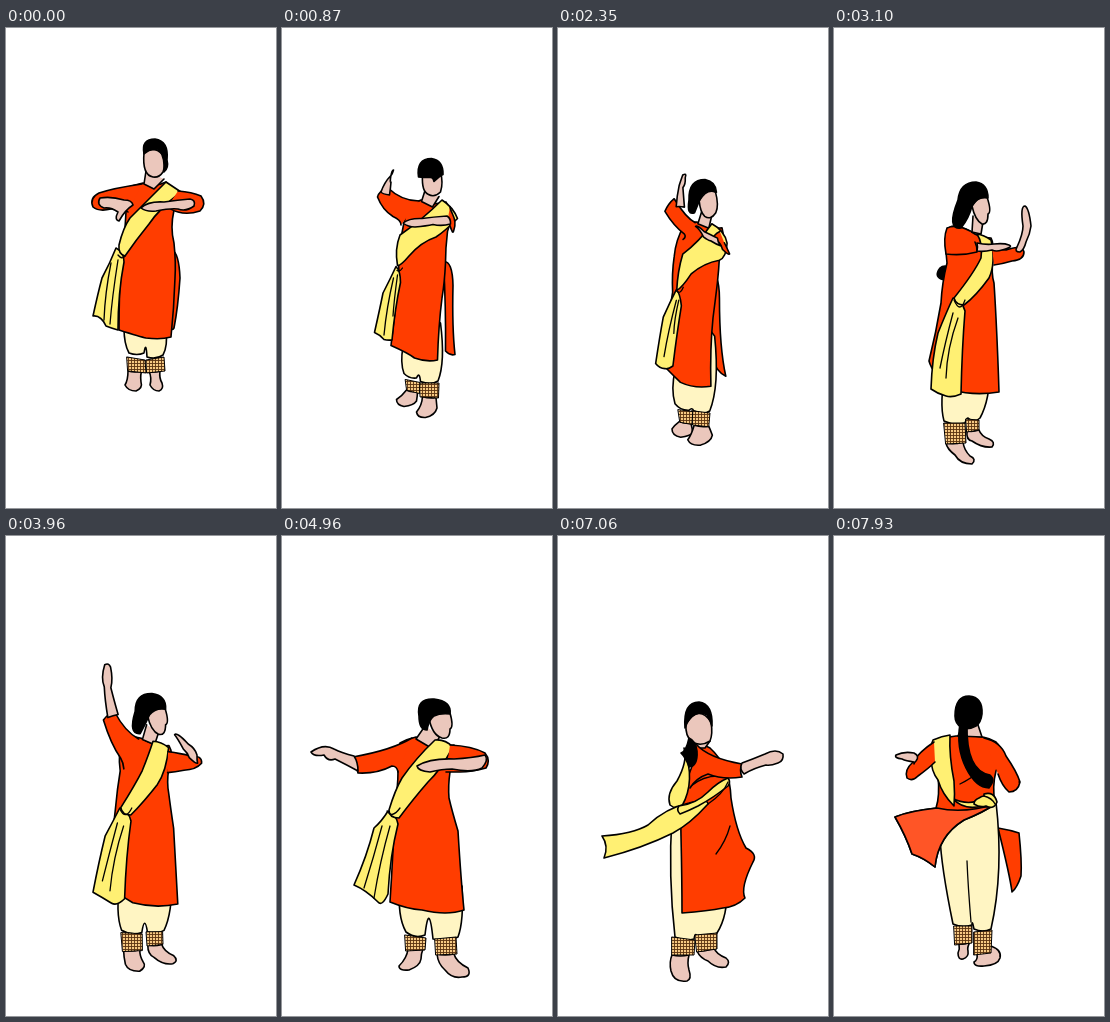
Recreate the animation shown at these times as an HTML page without scripts. Size 270 by 480 pixels, loop 8000 ms.

```html
<!DOCTYPE html>
<html lang="en">
<head>
<meta charset="utf-8">
<title>Dancer</title>
<style>
html,body{margin:0;width:100%;height:100%;overflow:hidden;background:#fff}
svg{display:block;width:100vw;height:100vh}
path{stroke:#000;stroke-width:1.6;stroke-linejoin:round;stroke-linecap:round;animation:8s steps(7) infinite}
.skin{fill:#ebc7bc}
.red{fill:#ff3d00}
.scarf{fill:#fff073}
.pale{fill:#fff5c3}
.bells{fill:url(#bells);stroke-width:1}
.line{fill:none;stroke-width:1.3}

/* Each part morphs between key poses; the step counts keep one drawing per 124 ms. */
#panel{animation-name:panel}
@keyframes panel{
0%{d:path("M166 222Q173 225 174 250 172 280 168 300 166 303 165 300 168 260 166 222Z");animation-timing-function:steps(14)}
21.62%{d:path("M157 245Q168 240 168 265 168 320 178 353 170 353 162 346 160 300 157 245Z");animation-timing-function:steps(11)}
38.75%{d:path("M140 240Q150 250 150 280 150 320 150 340 140 330 138 300 140 270 140 240Z");animation-timing-function:steps(32)}
88.25%{d:path("M160 270Q168 280 168 300 172 330 170 350 165 350 160 345 158 300 160 270Z")}
99.12%,to{d:path("M164 292Q176 294 185 297 188 325 187 340 183 352 178 356 176 340 164 292Z")}}
#backBraid{animation-name:backBraid}
@keyframes backBraid{
0%{d:path("M150 200Q150 200 150 200 150 200 150 200 150 200 150 200 150 200 150 200Z");animation-timing-function:steps(14)}
21.62%{d:path("M163 224Q158 230 161 240 165 247 170 239 175 232 171 226 167 223 163 224Z");animation-timing-function:steps(11)}
38.75%{d:path("M106 240Q100 248 107 251 114 254 116 242 116 238 111 238 108 238 106 240Z");animation-timing-function:steps(15)}
62%,to{d:path("M135 250Q135 250 135 250 135 250 135 250 135 250 135 250 135 250 135 250Z")}}
#footA{animation-name:footA}
@keyframes footA{
0%{d:path("M122 343Q122 352 119 357 122 363 130 363 137 360 135 354 134 346 136 343 129 345 122 343Z");animation-timing-function:steps(14)}
21.62%{d:path("M127 381Q118 384 110 386 107 391 114 394 126 395 134 392 137 388 135 384 130 384 127 381Z");animation-timing-function:steps(11)}
38.75%{d:path("M112 415Q113 421 121 427 126 436 138 436 143 431 136 428 130 422 129 414 120 417 112 415Z");animation-timing-function:steps(15)}
62%{d:path("M126 413Q125 422 117 430 117 435 127 434 138 430 139 423 139 418 141 413 133 415 126 413Z");animation-timing-function:steps(10)}
77.37%{d:path("M127 405Q121 412 123 422 138 434 146 440 154 441 152 435 145 427 144 411 135 409 127 405Z")}
88.25%{d:path("M114 419Q111 426 113 435 116 447 129 445 134 443 131 434 129 427 131 419 122 421 114 419Z")}
99.12%,to{d:path("M125 408Q126 413 124 417 124 424 129 423 135 421 134 415 133 411 136 406 130 409 125 408Z")}}
#footB{animation-name:footB}
@keyframes footB{
0%{d:path("M143 343Q146 350 144 357 147 363 153 363 158 361 156 355 153 350 154 343 149 345 143 343Z");animation-timing-function:steps(14)}
21.62%{d:path("M138 394Q134 405 125 411 124 417 134 416 148 414 154 405 156 400 154 396 146 397 138 394Z");animation-timing-function:steps(11)}
38.75%{d:path("M133 403Q132 412 138 413 148 420 158 419 162 414 155 411 147 408 145 402 139 404 133 403Z");animation-timing-function:steps(15)}
62%{d:path("M155 418Q156 428 163 434 170 443 180 441 190 441 186 432 174 426 172 418 163 420 155 418Z");animation-timing-function:steps(10)}
77.37%{d:path("M152 413Q154 419 166 422 175 428 186 426 189 421 180 418 170 415 168 411 160 415 152 413Z")}
88.25%{d:path("M139 415Q142 422 150 425 158 433 168 431 173 426 168 422 158 418 156 412 147 416 139 415Z")}
99.12%,to{d:path("M143 418Q144 424 140 426 140 431 150 430 164 429 166 422 168 414 157 410 150 416 143 418Z")}}
#pants{animation-name:pants}
@keyframes pants{
0%{d:path("M118 300Q118 316 123 325 131 328 138 325 140 312 141 329 150 332 157 327 162 318 160 300 140 296 118 300Z");animation-timing-function:steps(14)}
21.62%{d:path("M150 272Q110 330 121 366 124 374 131 375 135 374 136 378 148 383 155 379 165 350 157 290 156 274 150 272Z");animation-timing-function:steps(11)}
38.75%{d:path("M112 340Q105 375 110 393 120 398 131 395 133 388 135 391 141 395 146 390 156 372 156 340 134 330 112 340Z");animation-timing-function:steps(15)}
62%{d:path("M118 350Q115 380 124 396 133 403 143 399 147 364 151 403 165 406 176 401 182 385 180 350 148 345 118 350Z");animation-timing-function:steps(10)}
77.37%{d:path("M140 350Q133 382 138 388 146 388 152 394 156 400 160 400 168 402 172 398 185 378 184 350 160 345 140 350Z")}
88.25%{d:path("M114 280Q110 340 117 401 127 406 136 403 137 396 139 400 150 402 159 397 170 380 169 350 150 270 114 280Z")}
99.12%,to{d:path("M106 300Q107 330 119 388 128 392 138 389 138 383 140 393 149 397 157 393 170 335 162 266 115 270 106 300Z")}}
#bellsA{animation-name:bellsA}
@keyframes bellsA{
0%{d:path("M121 329L139 332 140 345 122 343Z");animation-timing-function:steps(14)}
21.62%{d:path("M126 374L137 377 135 386 128 382Z");animation-timing-function:steps(11)}
38.75%{d:path("M110 395L131 395 132 415 112 416Z");animation-timing-function:steps(15)}
62%{d:path("M123 399L144 402 143 414 124 415Z");animation-timing-function:steps(10)}
77.37%{d:path("M131 390L150 398 147 412 127 406Z")}
88.25%{d:path("M114 401L137 404 136 419 114 419Z")}
99.12%,to{d:path("M120 390L138 390 138 407 121 409Z")}}
#bellsB{animation-name:bellsB}
@keyframes bellsB{
0%{d:path("M140 332L158 329 159 343 141 345Z");animation-timing-function:steps(14)}
21.62%{d:path("M135 378L156 381 154 397 136 393Z");animation-timing-function:steps(11)}
38.75%{d:path("M132 391L145 392 145 402 133 404Z");animation-timing-function:steps(15)}
62%{d:path("M153 403L174 401 175 418 154 419Z");animation-timing-function:steps(10)}
77.37%{d:path("M150 399L170 397 170 411 154 414Z")}
88.25%{d:path("M137 399L159 397 159 413 139 416Z")}
99.12%,to{d:path("M140 396L158 394 157 417 140 419Z")}}
#kurta{animation-name:kurta}
@keyframes kurta{
0%{d:path("M137 155Q128 157 120 160 121 180 119 200 114 215 115 230 113 270 113 302 135 309 140 310 155 312 165 309 168 280 169 250 170 235 168 215 164 200 168 182 172 168 160 154 148 160 137 155Z");animation-timing-function:steps(14)}
21.62%{d:path("M141 189Q138 192 132 196 122 210 118 225 117 240 119 258 113 300 105 333 117 341 125 350 135 357 146 355 145 315 151 290 155 275 159 255 163 240 163 225 172 210 168 194 152 196 141 189Z");animation-timing-function:steps(11)}
38.75%{d:path("M136 203Q122 196 116 199 110 215 113 235 108 255 107 275 102 305 95 333 98 345 118 362 140 368 165 364 164 330 162 290 161 270 160 255 157 245 159 232 160 215 157 210 146 210 136 203Z");animation-timing-function:steps(15)}
62%{d:path("M134 201Q125 203 118 207 114 220 116 235 116 250 113 270 111 320 108 366 125 373 140 374 165 380 182 374 179 345 176 295 170 275 167 262 166 250 168 236 180 220 172 209 152 212 134 201Z");animation-timing-function:steps(10)}
77.37%{d:path("M137 206Q133 210 133 216 135 235 130 250 127 275 129 310 125 340 131 362 134 377 158 377 176 379 189 372 190 345 182 312 176 292 177 265 180 250 177 240 178 220 163 212 150 207 137 206Z")}
88.25%{d:path("M138 208Q136 215 135 228 128 245 126 255 122 275 123 300 124 345 124 377 150 375 165 372 178 371 187 362 182 352 195 326 200 318 188 312 178 295 173 262 172 230 152 212 145 208 138 208Z")}
99.12%,to{d:path("M122 200Q112 201 103 206 96 222 104 240 106 260 102 272 75 275 61 281 72 300 78 318 90 322 101 331 104 300 130 284 150 276 161 268 158 250 162 235 172 215 162 206 150 198 122 200Z")}}
#flap{fill:#ff5526;animation-name:flap}
@keyframes flap{
0%,88.25%{d:path("M124 300Q124 300 124 300 124 300 124 300 124 300 124 300 124 300 124 300 124 300 124 300 124 300 124 300Z");visibility:hidden}
99.12%,to{d:path("M103 272Q75 275 61 281 72 300 78 318 90 322 101 331 104 300 130 284 150 276 161 268 130 278 103 272Z");visibility:visible}}
#wrap{animation-name:wrap}
@keyframes wrap{
0%,62%{d:path("M130 245Q130 245 130 245 130 245 130 245 130 245 130 245 130 245 130 245Z");visibility:hidden;animation-timing-function:steps(10)}
77.37%{d:path("M132 233Q126 255 128 268 132 285 139 289 148 288 150 280 134 265 132 233Z")}
88.25%{d:path("M126 212Q130 225 119 245 108 258 112 269 118 274 124 270 138 245 126 212Z")}
99.12%,to{d:path("M118 262Q135 271 150 262 160 256 162 265 158 273 148 270 130 275 118 262Z")}}
#tail{animation-name:tail}
@keyframes tail{
0%{d:path("M110 220Q118 224 118 234 112 265 112 302 105 300 100 298 95 287 87 288 92 265 96 250 104 235 110 220Z");animation-timing-function:steps(14)}
21.62%{d:path("M118 257Q119 262 119 275 114 295 108 322 106 325 104 325 100 326 98 321 104 295 106 280 112 268 118 257Z");animation-timing-function:steps(11)}
38.75%{d:path("M119 270Q128 272 131 283 128 320 127 366 118 370 112 368 104 366 97 361 98 330 104 305 112 285 119 270Z");animation-timing-function:steps(15)}
62%{d:path("M106 275Q114 278 116 288 108 320 106 358 100 371 96 366 84 354 72 349 85 320 92 292 100 285 106 275Z");animation-timing-function:steps(10)}
77.37%{d:path("M176 240Q182 260 166 290 146 325 130 362 115 364 100 362 96 355 95 348 104 331 130 312 164 285 176 240Z")}
88.25%{d:path("M131 267Q150 262 150 268 132 288 115 297 85 312 46 322 51 310 44 300 75 298 90 289 108 272 131 267Z")}
99.12%,to{d:path("M150 258Q160 255 163 266 160 274 152 270 146 272 140 268 140 264 145 262 148 260 150 260 150 259 150 258Z")}}
#band{animation-name:band}
@keyframes band{
0%{d:path("M160 154Q166 158 175 164 153 181 143 196 130 212 119 228 112 226 113 217 117 200 124 190 143 171 160 154Z");animation-timing-function:steps(14)}
21.62%{d:path("M160 190Q176 200 176 217 172 226 165 222 148 216 135 228 125 250 118 258 108 242 112 224 138 212 160 190Z");animation-timing-function:steps(11)}
38.75%{d:path("M143 206Q150 207 157 212 162 235 155 250 142 268 130 277 122 277 120 270 140 245 147 230 149 215 143 206Z");animation-timing-function:steps(15)}
62%{d:path("M153 204Q163 203 171 211 158 235 146 246 132 262 117 282 107 282 107 274 113 254 120 242 134 222 153 204Z");animation-timing-function:steps(10)}
77.37%{d:path("M155 207Q167 212 175 222 178 232 177 240 173 228 168 222 165 218 162 214 158 210 156 208 155 207 155 207Z")}
88.25%{d:path("M170 242Q173 246 170 250 155 262 140 270 130 275 122 278 118 274 121 270 138 268 150 256 160 246 170 242Z")}
99.12%,to{d:path("M99 204Q108 200 116 199 115 220 120 245 121 258 120 270 108 258 104 244 97 235 97 222 96 210 99 204Z")}}
#folds{animation-name:folds}
@keyframes folds{
0%{d:path("M105 235Q99 265 98 292M112 232Q106 270 104 296M112 227Q116 232 119 228");animation-timing-function:steps(14)}
21.62%{d:path("M118 265Q110 295 106 322M119 262Q118 275 118 280M118 258Q120 256 122 252");animation-timing-function:steps(11)}
38.75%{d:path("M119 285Q111 315 106 340M124 290Q113 320 112 350M120 272Q126 286 131 272");animation-timing-function:steps(15)}
62%{d:path("M100 290Q92 320 82 352M108 290Q98 325 92 362M105 275Q110 283 118 272");animation-timing-function:steps(10)}
77.37%{d:path("M166 268Q150 292 132 318M140 262Q138 246 142 238M142 380Q155 390 168 378")}
88.25%{d:path("M172 290Q168 305 158 318M150 268Q165 258 170 246M133 250Q145 240 160 240")}
99.12%,to{d:path("M126 248Q138 242 146 235M150 260Q158 262 161 268M133 325Q134 350 137 386")}}
#neck{animation-name:neck}
@keyframes neck{
0%{d:path("M140 143L138 156 148 161 158 151");animation-timing-function:steps(14)}
21.62%{d:path("M146 182L141 191 153 197 156 186");animation-timing-function:steps(11)}
38.75%{d:path("M139 188L138 204 147 206 149 194");animation-timing-function:steps(15)}
62%{d:path("M143 190L134 203 151 213 158 200");animation-timing-function:steps(10)}
77.37%{d:path("M136 200L134 209 148 212 152 205")}
88.25%{d:path("M134 202L132 212 147 212 152 205")}
99.12%,to{d:path("M129 188L124 200 148 201 143 186")}}
#sleeveR{animation-name:sleeveR}
@keyframes sleeveR{
0%{d:path("M172 163Q186 164 195 168 201 176 194 183 182 187 172 184 164 182 162 178");animation-timing-function:steps(14)}
21.62%{d:path("M164 194Q150 198 146 204 148 212 150 220 160 225 168 222 172 216 170 202");animation-timing-function:steps(11)}
38.75%{d:path("M158 220Q165 222 172 222 188 216 190 224 190 232 178 233 168 236 160 237");animation-timing-function:steps(15)}
62%{d:path("M168 209Q190 210 203 217 209 224 204 232 190 236 178 236 170 236 164 236");animation-timing-function:steps(6)}
71.24%{d:path("M168 209Q195 214 220 215 222 222 222 230 200 236 180 238 172 240 166 238");animation-timing-function:steps(4)}
77.37%{d:path("M150 220Q160 220 170 228 172 232 172 238 160 240 155 238 150 236 150 235")}
88.25%{d:path("M150 222Q160 225 175 230 176 234 176 238 160 240 155 237 150 236 148 235")}
99.12%,to{d:path("M150 202Q167 206 172 220 183 236 186 246 184 256 175 256 168 250 164 238")}}
#armR{animation-name:armR}
@keyframes armR{
0%{d:path("M184 171Q172 172 158 174 142 173 135 180 140 184 150 183 165 180 172 181 180 184 188 178 190 172 184 171Z");animation-timing-function:steps(14)}
21.62%{d:path("M146 205Q130 206 122 207 112 207 107 210 112 214 116 215 124 216 130 212 140 213 149 214 148 209 146 205Z");animation-timing-function:steps(11)}
38.75%{d:path("M183 219Q189 206 189 198 186 178 191 178 195 180 197 198 196 206 192 214 190 222 186 224 180 224 183 219Z");animation-timing-function:steps(15)}
62%{d:path("M203 219Q190 222 172 223 148 222 135 230 136 235 148 236 160 233 170 233 190 237 200 232 207 224 203 219Z");animation-timing-function:steps(6)}
71.24%{d:path("M220 216Q232 214 242 213 255 207 268 212 262 216 256 219 250 224 243 222 232 226 222 229 222 222 220 216Z");animation-timing-function:steps(4)}
77.37%{d:path("M176 227Q185 228 190 229 196 226 198 232 198 236 194 236 190 236 188 235 184 236 178 238 176 232 176 227Z")}
88.25%{d:path("M184 228Q195 225 207 220 216 216 222 220 223 224 218 225 212 227 208 227 196 230 186 236 183 232 184 228Z")}
99.12%,to{d:path("M185 246Q185 246 185 246 185 246 185 246 185 246 185 246 185 246 185 246 185 246 185 246 185 246 185 246Z")}}
#sleeveL{animation-name:sleeveL}
@keyframes sleeveL{
0%{d:path("M136 156Q108 160 93 165 83 170 87 179 93 184 105 181 118 180 122 184");animation-timing-function:steps(14)}
21.62%{d:path("M138 190Q131 186 118 154 111 156 104 159 108 180 117 196 120 204 116 210");animation-timing-function:steps(11)}
38.75%{d:path("M136 203Q122 196 113 200 109 210 112 226 128 228 143 224 143 218 141 214")}
49.56%{d:path("M132 203Q118 195 108 172 101 172 95 177 101 205 110 222 113 228 114 236");animation-timing-function:steps(8)}
62%{d:path("M130 202Q110 214 71 221 74 228 76 237 95 238 110 230 115 230 116 236");animation-timing-function:steps(10)}
77.37%{d:path("M140 206Q158 212 176 226 174 234 178 241 155 244 140 240 136 242 136 250")}
88.25%{d:path("M138 208Q150 222 184 228 181 234 184 241 165 244 150 238 138 242 132 252")}
99.12%,to{d:path("M100 206Q85 216 79 226 70 234 73 242 78 246 84 240 95 232 101 226")}}
#armL{animation-name:armL}
@keyframes armL{
0%{d:path("M94 170Q105 168 118 172 126 172 127 177 119 182 113 193 108 192 112 184 105 179 98 180 90 177 94 170Z");animation-timing-function:steps(14)}
21.62%{d:path("M104 158Q100 140 99 124 94 122 96 107 100 102 104 108 108 118 106 124 112 142 117 154 110 155 104 158Z");animation-timing-function:steps(11)}
38.75%{d:path("M143 215Q152 217 160 216 170 215 175 217 180 219 168 222 162 224 158 222 150 224 143 223 144 219 143 215Z")}
49.56%{d:path("M95 176Q90 155 88 140 82 130 86 114 90 111 94 116 98 130 96 140 102 158 107 171 101 173 95 176Z");animation-timing-function:steps(8)}
62%{d:path("M72 220Q60 217 52 213 42 207 29 216 32 221 42 219 46 226 53 223 65 229 76 235 76 226 72 220Z");animation-timing-function:steps(10)}
77.37%{d:path("M176 226Q185 226 190 226 198 222 200 230 200 238 196 237 192 238 190 236 184 238 178 240 175 233 176 226Z")}
88.25%{d:path("M184 227Q195 223 207 218 218 212 225 218 226 225 220 227 212 230 208 229 196 232 186 238 181 233 184 227Z")}
99.12%,to{d:path("M80 226Q72 225 68 223 60 222 62 219 70 215 80 217 86 220 82 225 80 227 80 228 80 228 80 226Z")}}
#face{animation-name:face}
@keyframes face{
0%{d:path("M138 125Q148 117 157 127 160 136 157 144 153 150 147 149 136 147 138 125Z");animation-timing-function:steps(14)}
21.62%{d:path("M143 170Q150 157 160 161 163 174 160 184 152 190 146 184 143 180 143 170Z");animation-timing-function:steps(11)}
38.75%{d:path("M138 178Q146 166 153 169 158 184 154 186 154 197 148 196 141 192 138 178Z");animation-timing-function:steps(15)}
62%{d:path("M147 182Q158 170 168 177 172 191 168 193 168 204 160 202 150 199 147 182Z");animation-timing-function:steps(10)}
77.37%{d:path("M134 188Q147 168 158 184 160 196 157 203 147 209 139 204 133 198 134 188Z")}
88.25%{d:path("M128 188Q141 168 153 186 155 198 152 205 143 211 134 206 127 200 128 188Z")}
99.12%,to{d:path("M128 180Q138 172 146 180 146 186 142 189 137 191 130 190 128 188 128 180Z")}}
#hair{animation-name:hair}
@keyframes hair{
0%{d:path("M138 126Q135 111 149 111 163 113 161 132 163 140 158 144 159 130 154 123 146 119 138 126Z");animation-timing-function:steps(14)}
21.62%{d:path("M135 172Q133 150 150 150 160 152 161 161 152 156 146 163 143 168 142 176 138 180 135 172Z");animation-timing-function:steps(11)}
38.75%{d:path("M124 172Q126 154 142 154 154 156 154 170 143 168 138 178 135 190 127 200 112 202 124 172Z");animation-timing-function:steps(15)}
62%{d:path("M137 180Q134 162 152 163 170 165 168 178 158 177 152 180 147 184 145 194 137 194 137 180Z");animation-timing-function:steps(10)}
77.37%{d:path("M133 192Q129 166 146 166 160 168 159 188 157 184 154 178 145 172 138 180 135 186 133 192Z")}
88.25%{d:path("M127 192Q125 166 141 166 155 168 154 190 152 184 149 179 141 174 133 181 129 186 127 192Z")}
99.12%,to{d:path("M121 180Q121 160 135 160 149 161 148 178 147 187 142 190 135 194 128 192 121 188 121 180Z")}}
#braid{animation-name:braid}
@keyframes braid{
0%{d:path("M150 116Q150 116 150 116 150 116 150 116 150 116 150 116 150 116 150 116Z");animation-timing-function:steps(14)}
21.62%{d:path("M147 156Q147 156 147 156 147 156 147 156 147 156 147 156 147 156 147 156Z");animation-timing-function:steps(11)}
38.75%{d:path("M138 163Q138 163 138 163 138 163 138 163 138 163 138 163 138 163 138 163Z");animation-timing-function:steps(15)}
62%{d:path("M141 180Q141 180 141 180 141 180 141 180 141 180 141 180 141 180 141 180Z");animation-timing-function:steps(10)}
77.37%{d:path("M136 202Q130 222 122 234 108 240 108 250 114 258 122 246 136 228 139 206Z")}
88.25%{d:path("M131 202Q128 216 123 217 128 222 131 231 140 230 139 215 138 205 131 202Z")}
99.12%,to{d:path("M126 188Q122 212 132 232 142 252 155 252 162 244 156 239 132 235 133 188Z")}}
</style>
</head>
<body>
<svg viewBox="0 0 270 480">
<defs>
<pattern id="bells" width="3" height="3" patternUnits="userSpaceOnUse">
<rect width="3" height="3" fill="#5a3210"/><rect width="2.1" height="2.1" fill="#f6c983"/>
</pattern>
</defs>
<path id="panel" class="red"/>
<path id="backBraid"/>
<path id="footA" class="skin"/>
<path id="footB" class="skin"/>
<path id="pants" class="pale"/>
<path id="bellsB" class="bells"/>
<path id="bellsA" class="bells"/>
<path id="kurta" class="red"/>
<path id="flap"/>
<path id="wrap" class="scarf"/>
<path id="tail" class="scarf"/>
<path id="neck" class="skin"/>
<path id="band" class="scarf"/>
<path id="folds" class="line"/>
<path id="sleeveR" class="red"/>
<path id="armR" class="skin"/>
<path id="sleeveL" class="red"/>
<path id="armL" class="skin"/>
<path id="face" class="skin"/>
<path id="hair"/>
<path id="braid"/>
</svg>
</body>
</html>
```
